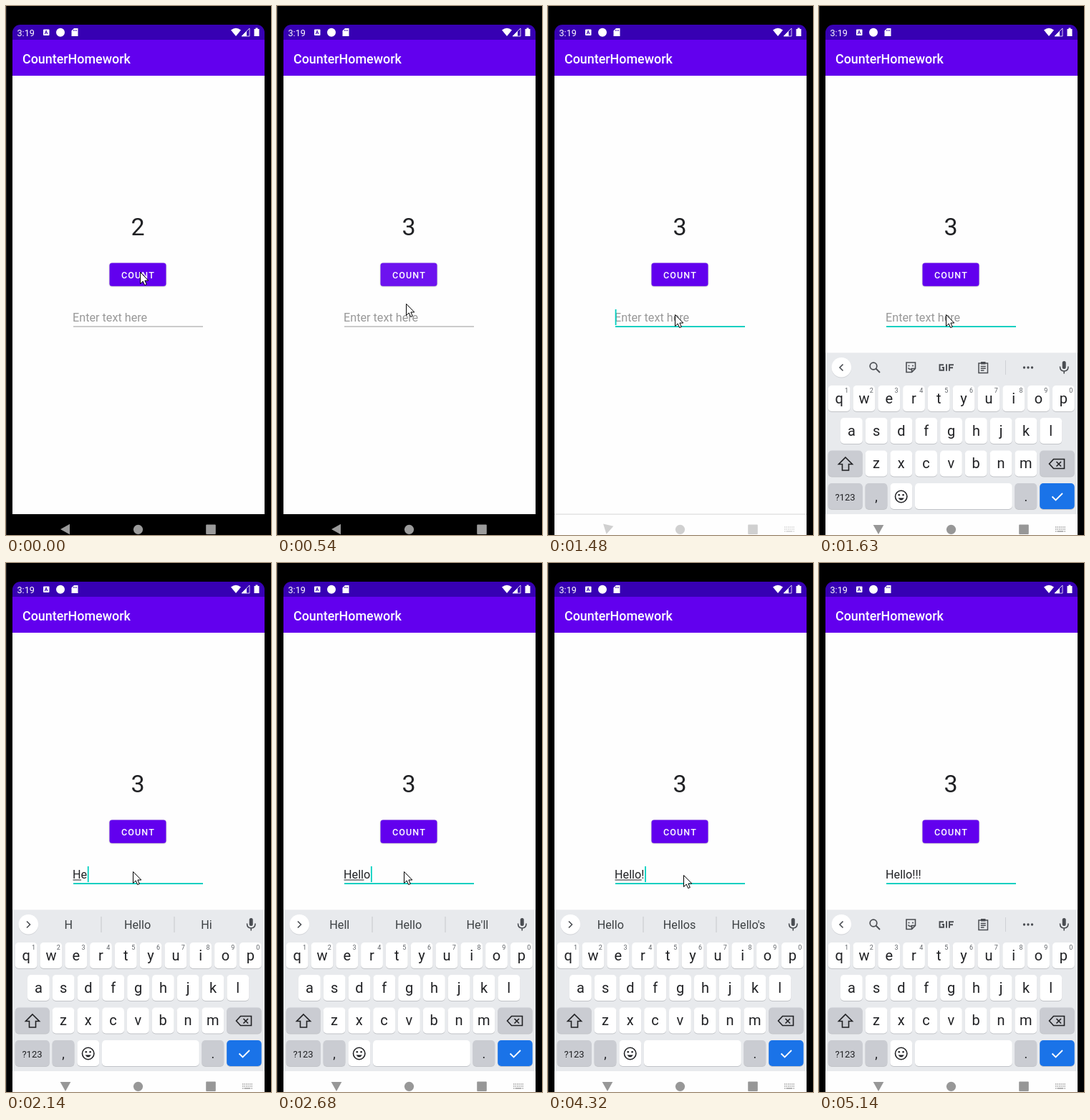
These frames come from a looping animation (370x736 px, 5290 ms). An HTML page with a canvas:

```html
<!DOCTYPE html>
<html lang="en">
<head>
<meta charset="utf-8">
<title>Counter</title>
<style>
  html, body { margin: 0; width: 100%; height: 100%; overflow: hidden; background: #000; }
  canvas { display: block; }
</style>
</head>
<body>
<canvas id="stage" width="370" height="736"></canvas>
<script>
const ctx = document.getElementById('stage').getContext('2d');
const LOOP = 5290;
const PURPLE = '#6200ee', TEAL = '#03d0c0', INK = '#202124', ICON = '#4a4d52';
const FIELD_FONT = 16.2, FIELD_X = 93;

// Each track lists [start time, value]; a value holds until the next one.
const tracks = {
  count: [[0, '2'], [270, '3']],
  pointer: [[0, [187, 370]], [420, [186, 379]], [540, [180, 414]], [660, [177, 429]],
            [4320, [189, 434]], [4440, [226, 490]], [4560, [262, 552]],
            [4710, [302, 699]], [4860, null]],
  ripple: [[0, [0, 0]], [120, [25, 0.2]], [270, [90, 0.24]], [420, [90, 0.16]],
           [540, [90, 0.07]], [660, [0, 0]]],
  focus: [[0, 0], [970, 0.5], [1090, 1]],
  caret: [[0, false], [1090, true], [1630, false], [1900, true], [3300, false],
          [3730, true], [5140, false]],
  typed: [[0, ''], [1900, 'H'], [2140, 'He'], [2260, 'Hel'], [2380, 'Hell'],
          [2530, 'Hello'], [4320, 'Hello!'], [4440, 'Hello!!'], [4560, 'Hello!!!']],
  marked: [[0, ''], [2020, 'H'], [2380, 'He'], [2530, 'Hell'], [2830, 'Hello'], [4440, '']],
  hints: [[0, null], [2020, ['H', 'Hello', 'Hi']], [2380, ['He', 'Hello', 'Hey']],
          [2530, ['Hel', 'Hello', 'Help']], [2680, ['Hell', 'Hello', 'He\'ll']],
          [2830, ['Hello', 'Hellos', 'Hello\'s']], [4440, null]],
  // nav: background, icon colour, back-arrow turn in degrees
  nav: [[0, ['#000', '#9b9b9b', 0]], [1330, ['#777', '#b5b5b5', -35]],
        [1480, ['#fefefe', '#d0d0d0', -78]], [1630, ['#fefefe', '#979797', -90]]]
};

function at(name, t) {
  let value;
  for (const [start, v] of tracks[name]) if (t >= start) value = v;
  return value;
}

function rect(x, y, w, h, color) {
  ctx.fillStyle = color;
  ctx.fillRect(x, y, w, h);
}

function round(x, y, w, h, r, color) {
  ctx.beginPath();
  ctx.roundRect(x, y, w, h, r);
  ctx.fillStyle = color;
  ctx.fill();
}

function disc(x, y, r, color) {
  ctx.beginPath();
  ctx.arc(x, y, r, 0, Math.PI * 2);
  ctx.fillStyle = color;
  ctx.fill();
}

function shape(d, fill, stroke, width = 1) {
  const path = new Path2D(d);
  if (fill) { ctx.fillStyle = fill; ctx.fill(path); }
  if (stroke) { ctx.strokeStyle = stroke; ctx.lineWidth = width; ctx.stroke(path); }
}

function setFont(size, weight = 400) {
  ctx.font = `${weight} ${size}px Roboto, sans-serif`;
}

function text(str, x, y, size, color, align = 'left', weight = 400) {
  setFont(size, weight);
  ctx.textAlign = align;
  ctx.fillStyle = color;
  ctx.fillText(str, x, y);
}

function drawBars() {
  rect(0, 0, 370, 736, '#000');
  rect(0, 0, 1, 736, '#2b2b2b');
  round(9, 26, 352, 30, [11, 11, 0, 0], '#3700b3');
  rect(9, 47, 352, 50, PURPLE);
  rect(9, 97, 352, 610, '#fefefe');
  text('3:19', 15.5, 41.5, 12.6, '#fff');
  round(52, 32.5, 8.5, 8.5, 1, '#fff');
  text('A', 56.2, 39.3, 7, '#3700b3', 'center', 700);
  disc(76, 36.8, 6, '#fff');
  shape('M95 31H100.5V42H91.5V34.5Z', '#fff');
  shape('M94.5 33V35M96.5 33V35M98.5 33V35', null, '#3700b3', 0.8);
  shape('M314 33.5Q321 28 328 33.5L321 42Z', '#fff');
  shape('M340 31V42H329Z', null, '#fff', 0.8);
  shape('M336 35V42H329Z', '#fff');
  shape('M348.5 30.5H351.5V32H353.5V42H346.5V32H348.5Z', '#fff');
  text('CounterHomework', 23, 79.5, 17.9, '#fff', 'left', 500);
}

function drawButton([radius, alpha]) {
  ctx.save();
  ctx.shadowColor = 'rgba(0,0,0,.3)';
  ctx.shadowBlur = 2;
  ctx.shadowOffsetY = 0.5;
  round(144.5, 357.5, 79, 32.3, 3.6, PURPLE);
  ctx.restore();
  if (radius) {
    ctx.save();
    ctx.beginPath();
    ctx.roundRect(144.5, 357.5, 79, 32.3, 3.6);
    ctx.clip();
    disc(185, 374, radius, `rgba(255,255,255,${alpha})`);
    ctx.restore();
  }
  ctx.letterSpacing = '1.12px';
  text('COUNT', 161, 378.6, 12.5, '#fff', 'left', 500);
  ctx.letterSpacing = '0px';
}

function drawField(t) {
  const typed = at('typed', t), marked = at('marked', t), focus = at('focus', t);
  text(typed || 'Enter text here', FIELD_X, 439.4, FIELD_FONT, typed ? INK : '#989898');
  if (marked) rect(FIELD_X + 0.5, 440.5, ctx.measureText(marked).width, 1, INK);
  rect(94, 445.5, 181, 1, '#999');
  if (focus) {
    const w = 181 * focus;
    rect(184.5 - w / 2, 445.2, w, 1.8, TEAL);
  }
  if (at('caret', t)) {
    const w = typed ? ctx.measureText(typed).width : 0;
    rect(FIELD_X + w + 0.7, 422, 1.8, 22, TEAL);
  }
}

function key(x, y, w, color = '#fff') {
  round(x, y + 1, w, 36, 5, '#c2c4c8');
  round(x, y, w, 36, 5, color);
}

function drawKeys() {
  const pitch = 34.8, rows = [['qwertyuiop', 12.7, 528], ['asdfghjkl', 30, 573], ['zxcvbnm', 64.6, 618.5]];
  for (const [letters, left, y] of rows) {
    [...letters].forEach((letter, i) => {
      const x = left + i * pitch;
      key(x, y, 30.8);
      text(letter, x + 15.4, y + 24.5, 20, INK, 'center');
      if (y === 528) text((i + 1) % 10, x + 25.8, y + 10, 9, '#5f6368', 'center');
    });
  }
  const gray = '#caccd2';
  key(12.7, 618.5, 48, gray);
  key(308.2, 618.5, 48.5, gray);
  key(12.7, 664, 48, gray);
  key(64.6, 664, 30.8, gray);
  key(99.4, 664, 30.8);
  key(134, 664, 135.8);
  key(273.4, 664, 30.8, gray);
  key(308.2, 664, 48.5, '#1a73e8');
  text('?123', 36.5, 687.5, 13, INK, 'center');
  text(',', 80, 688.5, 18, INK, 'center');
  text('.', 288.8, 689, 18, INK, 'center');
  shape('M37 628L46.5 637.5H41.5V646H32.5V637.5H27.5Z', null, INK, 1.6);
  shape('M327.5 630.5H342.5V643.5H327.5L321.5 637ZM331.5 634L338 640.5M338 634L331.5 640.5', null, INK, 1.6);
  shape('M325.5 682.5L330.5 687.5L340 678', null, '#fff', 1.8);
  ctx.beginPath();
  ctx.arc(114.7, 682.5, 8.2, 0, Math.PI * 2);
  shape('M110.5 684.5Q114.7 690.5 119 684.5Z', INK);
  ctx.strokeStyle = INK;
  ctx.lineWidth = 1.6;
  ctx.stroke();
  disc(111.8, 680.3, 1.3, INK);
  disc(117.6, 680.3, 1.3, INK);
}

function drawToolbar() {
  shape('M33.5 498.5L29 503L33.5 507.5', null, ICON, 1.6);
  ctx.beginPath();
  ctx.arc(76, 501, 4.8, 0, Math.PI * 2);
  ctx.strokeStyle = ICON;
  ctx.lineWidth = 1.7;
  ctx.stroke();
  shape('M79.5 504.5L85 510', null, ICON, 1.8);
  shape('M122 496H134.5V504.5L129.5 509.5H122ZM134.5 504.5H129.5V509.5M124.5 503.5Q126.5 506.5 129 505', null, ICON, 1.6);
  disc(125.5, 500.5, 1, ICON);
  disc(131, 500.5, 1, ICON);
  shape('M174 499.2H168.5V506.8H174V503H171.8M178 498.2V507.8M182 507.8V499.2H188M182 503.3H187', null, ICON, 1.9);
  shape('M223 497H235.5V510.5H223ZM225.8 501.5H232.8M225.8 504.3H232.8M225.8 507H230.5', null, ICON, 1.5);
  rect(226, 495, 6.5, 3.5, ICON);
  rect(260, 493, 1, 20, '#cfd1d5');
  for (const x of [286.5, 292, 297.5]) disc(x, 503, 1.7, ICON);
}

function drawHints(words) {
  shape('M29 498.5L33.5 503L29 507.5', null, ICON, 1.6);
  words.forEach((word, i) => text(word, 87.3 + i * 96.3, 509, FIELD_FONT, '#3c4043', 'center'));
  rect(132.5, 492, 1, 22, '#c5c7cb');
  rect(234.5, 492, 1, 22, '#c5c7cb');
}

function drawKeyboard(hints) {
  rect(9, 482.5, 352, 225, '#e8eaed');
  disc(31.3, 503.8, 13.8, '#d2d4d8');
  disc(31.3, 502.8, 13.8, '#fff');
  if (hints) drawHints(hints); else drawToolbar();
  round(339.7, 494, 5, 11, 2.5, ICON);
  shape('M336.5 501.5Q336.5 508 342.2 508Q348 508 348 501.5M342.2 508V511.5', null, ICON, 1.6);
  drawKeys();
}

function drawNav(t) {
  const [back, icon, turn] = at('nav', t);
  rect(9, 707, 352, 29, back);
  if (t >= 1480 && t < 1630) rect(9, 706.5, 352, 1.2, '#dedede');
  ctx.save();
  ctx.translate(83, 728);
  ctx.rotate(turn * Math.PI / 180);
  shape('M-7 0L6 -7.3V7.3Z', icon);
  ctx.restore();
  disc(184.5, 728.3, 6.6, icon);
  round(279.2, 721.5, 13.6, 13.6, 1, icon);
  if (t < 1210) return;
  for (let i = 0; i < 6; i++) {
    rect(330 + i * 2.5, 724.3, 1.4, 1.4, icon);
    rect(330 + i * 2.5, 727.2, 1.4, 1.4, icon);
  }
  rect(330, 730.2, 1.4, 1.4, icon);
  rect(332.5, 730.2, 8.8, 1.4, icon);
  rect(342.5, 730.2, 1.4, 1.4, icon);
}

function drawPointer(pos) {
  if (!pos) return;
  ctx.save();
  ctx.translate(pos[0] + 0.5, pos[1] + 0.5);
  shape('M0 0V16L3.7 12.5L6.2 18L8.8 16.9L6.4 11.5H11.3Z', '#fff', '#000', 1);
  ctx.restore();
}

function draw(t) {
  drawBars();
  text(at('count', t), 184, 318.6, 34, INK, 'center');
  drawButton(at('ripple', t));
  drawField(t);
  if (t >= 1630) drawKeyboard(at('hints', t));
  drawNav(t);
  drawPointer(at('pointer', t));
}

const start = performance.now();
function tick() {
  draw((performance.now() - start) % LOOP);
  requestAnimationFrame(tick);
}
tick();
</script>
</body>
</html>
```
